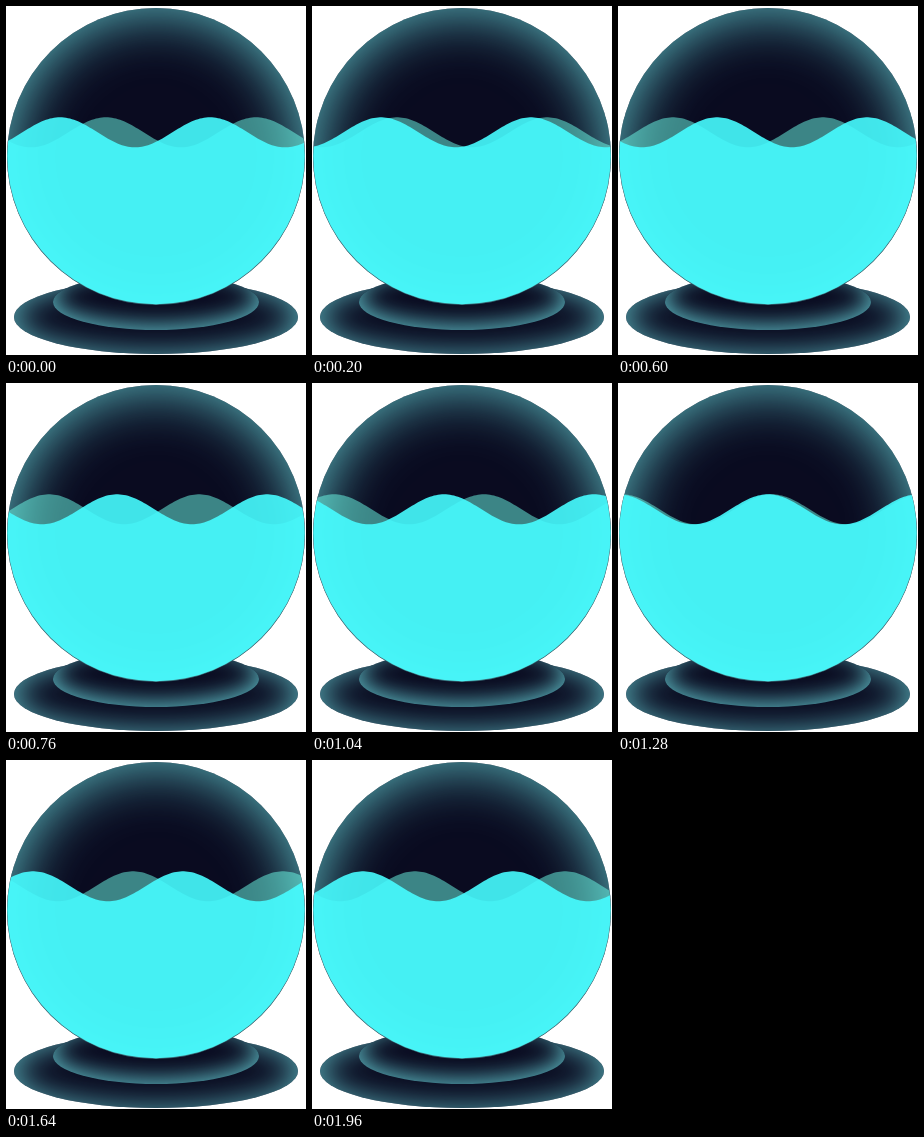
An HTML page that plays this animation: 300 by 349 pixels, repeating every 2000 ms.

```html
<!DOCTYPE html>
<html lang="en">
<head>
<meta charset="utf-8">
<title>Liquid globe</title>
<style>
  html, body { margin: 0; width: 100%; height: 100%; overflow: hidden; background: #fff; }
  .stage { position: relative; width: 300px; height: 349px; overflow: hidden; }
  .stage > * { position: absolute; }
  .disc { border-radius: 50%; background: #0a0b20; }
  .base { left: 8px; top: 274px; width: 284px; height: 74px; box-shadow: inset 0 0 30px rgb(84, 165, 175); }
  .step { left: 47px; top: 268px; width: 206px; height: 56px; box-shadow: inset 0 -5px 22px rgb(88, 175, 184); }
  .globe { left: 1px; top: 1.5px; width: 298px; height: 297px; box-shadow: inset 0 0 60px rgb(95, 195, 200); }
  svg { left: 0; top: 0; }
</style>
</head>
<body>
<div class="stage">
  <div class="disc base"></div>
  <div class="disc step"></div>
  <div class="disc globe"></div>
  <svg width="300" height="349" viewBox="0 0 300 349">
    <clipPath id="bowl"><ellipse cx="150" cy="150" rx="148.6" ry="148.2"/></clipPath>
    <g clip-path="url(#bowl)">
      <path id="back" fill="rgb(110,255,236)" fill-opacity=".5"/>
      <path id="front" fill="rgb(70,252,255)" fill-opacity=".9"/>
    </g>
  </svg>
</div>
<script>
  const LOOP = 2000, STEP = 40;
  const LENGTH = 150, LEVEL = 126.3, HEIGHT = 15;
  const back = document.getElementById('back');
  const front = document.getElementById('front');

  // Water body whose surface has a crest at the given x
  function water(crest) {
    let d = 'M0 300';
    for (let x = 0; x <= 300; x += 2) {
      const y = LEVEL - HEIGHT * Math.cos((x - crest) / LENGTH * 2 * Math.PI);
      d += `L${x} ${y.toFixed(2)}`;
    }
    return d + 'L300 300Z';
  }

  function draw(now) {
    const t = Math.floor((now % LOOP) / STEP) * STEP;
    const shift = LENGTH * t / LOOP;
    front.setAttribute('d', water(54 + shift));
    back.setAttribute('d', water(100 - shift));
  }

  let start;
  function tick(now) {
    start ??= now;
    draw(now - start);
    requestAnimationFrame(tick);
  }
  draw(0);
  requestAnimationFrame(tick);
</script>
</body>
</html>
```
